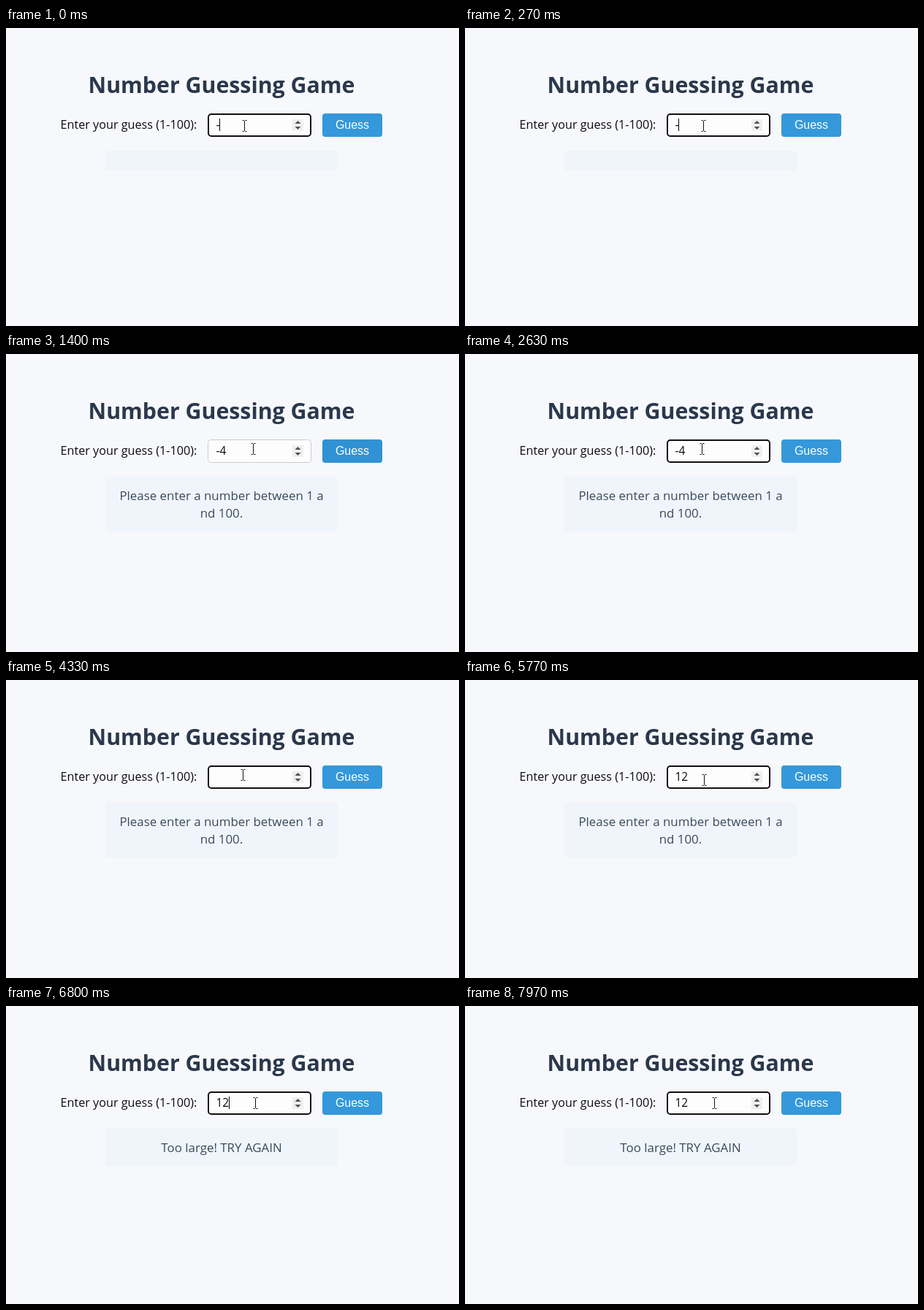
Recreate the animation shown at these times as an HTML page. Size 620 px wide and 408 px high, loop 8000 ms.

```html
<!DOCTYPE html>
<html lang="en">
<head>
<meta charset="utf-8">
<title>Number Guessing Game</title>
<style>
  html, body { margin: 0; width: 100%; height: 100%; overflow: hidden; background: #f7f8fb; }
  svg { display: block; width: 620px; height: 408px; }
  text { font-family: "Open Sans", "Noto Sans", sans-serif; white-space: pre; }
  .title { font-size: 30.3px; font-weight: 700; fill: #2a384c; }
  .label { font-size: 16.2px; fill: #0c0c0e; }
  .value { font-size: 15.5px; fill: #0c0c0e; }
  .button { font-family: "Liberation Sans", sans-serif; font-size: 16px; fill: #fff; }
  .message { font-size: 16.9px; fill: #3b4a5a; }
  .middle { text-anchor: middle; }
</style>
</head>
<body>
<svg viewBox="0 0 620 408">
  <text class="title middle" x="295" y="89">Number Guessing Game</text>
  <text class="label" x="74.5" y="138">Enter your guess (1-100):</text>

  <rect id="field" fill="#fdfdfe"/>
  <text id="value" class="value" x="287.5" y="138"></text>
  <rect id="caret" y="124" width="1" height="17"/>
  <g id="spinner">
    <rect x="392" y="125" width="15" height="16" fill="#efeff1"/>
    <path d="M395.5 131 399.5 127 403.5 131ZM395.5 135 399.5 139 403.5 135Z" fill="#505052"/>
  </g>

  <rect id="button" x="433" y="117" width="82" height="32" rx="4"/>
  <text class="button middle" x="474" y="138">Guess</text>

  <rect id="panel" x="136" y="168" width="318" rx="4" fill="#eff5fa"/>
  <g id="message" class="message middle">
    <text id="line1" x="295" y="200"></text>
    <text id="line2" x="295" y="224"></text>
  </g>

  <path id="beam" d="M-3 -7.5H-1L0 -6.5 1 -7.5H3M0 -6.5V6.5M-3 7.5H-1L0 6.5 1 7.5H3" fill="none" stroke="#111"/>
  <path id="hand" d="M-1.5 1.5Q0 -.5 1.5 1.5V8Q3.5 6.5 4.5 9Q6.5 7.5 7.5 10Q9.5 9 9.5 12V17Q9.5 19 7.5 21V24H-2V21L-7 14Q-7 11 -4 12L-1.5 14.5ZM1.5 8V12M4.5 9V12.5M7.5 10V13" fill="#fff" stroke="#111"/>
</svg>
<script>
const LOOP = 8000, CARET_ON = 600, FADE = 250, HOVER = 300;
const $ = id => document.getElementById(id);
const set = (id, attrs) => {
  for (const name in attrs) $(id).setAttribute(name, attrs[name]);
};
const show = (id, on) => set(id, { visibility: on ? 'visible' : 'hidden' });
const clamp = v => Math.max(0, Math.min(1, v));
const ease = v => v * v * (3 - 2 * v);

// time, typed value, focused
const inputStates = [
  [0, '-', true], [330, '-4', true], [1060, '-4', false], [2000, '-4', true],
  [3180, '-', true], [3730, '', true], [5030, '1', true], [5170, '12', true],
  [6090, '12', false], [6800, '12', true]
];

// time, lines
const messages = [
  [0],
  [1100, 'Please enter a number between 1 a', 'nd 100.'],
  [6200, 'Too large! TRY AGAIN']
];

// time, x, y
const pointerPath = [
  [0, 326, 134], [300, 326, 134], [800, 321, 140], [840, 321, 140],
  [1000, 456, 133], [1120, 456, 133], [1380, 338, 130], [1700, 338, 130],
  [1950, 324, 130], [5170, 324, 130], [5200, 324, 137], [5750, 324, 137],
  [5980, 456, 133], [6270, 456, 133], [6700, 341, 133], [LOOP, 341, 133]
];

// times at which the pointer enters and leaves the button
const hovers = [[950, 1190], [5910, 6380]];

const latest = (list, t) => list.filter(item => item[0] <= t).pop();

function pointerAt(t) {
  const i = pointerPath.findIndex(point => point[0] > t);
  const [t0, x0, y0] = pointerPath[i - 1], [t1, x1, y1] = pointerPath[i];
  const k = ease((t - t0) / (t1 - t0));
  return [x0 + (x1 - x0) * k, y0 + (y1 - y0) * k].map(Math.round);
}

function buttonColor(t) {
  const amount = Math.max(...hovers.map(([enter, leave]) =>
    ease(clamp((t - enter) / HOVER)) * (1 - ease(clamp((t - leave) / HOVER)))));
  const normal = [52, 152, 219], dark = [32, 122, 184];
  return `rgb(${normal.map((c, i) => Math.round(c + (dark[i] - c) * amount))})`;
}

function draw(t) {
  const [changed, value, focused] = latest(inputStates, t);
  const [x, y] = pointerAt(t);
  const overInput = x < 418, overButton = x >= 425;

  $('value').textContent = value;
  const inset = focused ? 1 : 0.5;
  set('field', {
    x: 276 + inset, y: 117 + inset, width: 142 - 2 * inset, height: 32 - 2 * inset,
    rx: 4, stroke: focused ? '#101010' : '#ccccd0', 'stroke-width': 2 * inset
  });
  const textWidth = value ? $('value').getComputedTextLength() : 0;
  set('caret', { x: Math.round(287 + textWidth) });
  show('caret', focused && t - changed < CARET_ON);
  show('spinner', focused || overInput);

  set('button', { fill: buttonColor(t) });

  const [shown, ...lines] = latest(messages, t);
  $('line1').textContent = lines[0] || '';
  $('line2').textContent = lines[1] || '';
  set('message', { opacity: clamp((t - shown) / FADE) });
  set('panel', { height: 27 + 24 * lines.length });

  const place = { transform: `translate(${x + 0.5} ${y})` };
  set('beam', place);
  set('hand', place);
  show('beam', !overButton);
  show('hand', overButton);
}

const start = performance.now();
function tick() {
  draw((performance.now() - start) % LOOP);
  requestAnimationFrame(tick);
}
tick();
</script>
</body>
</html>
```
